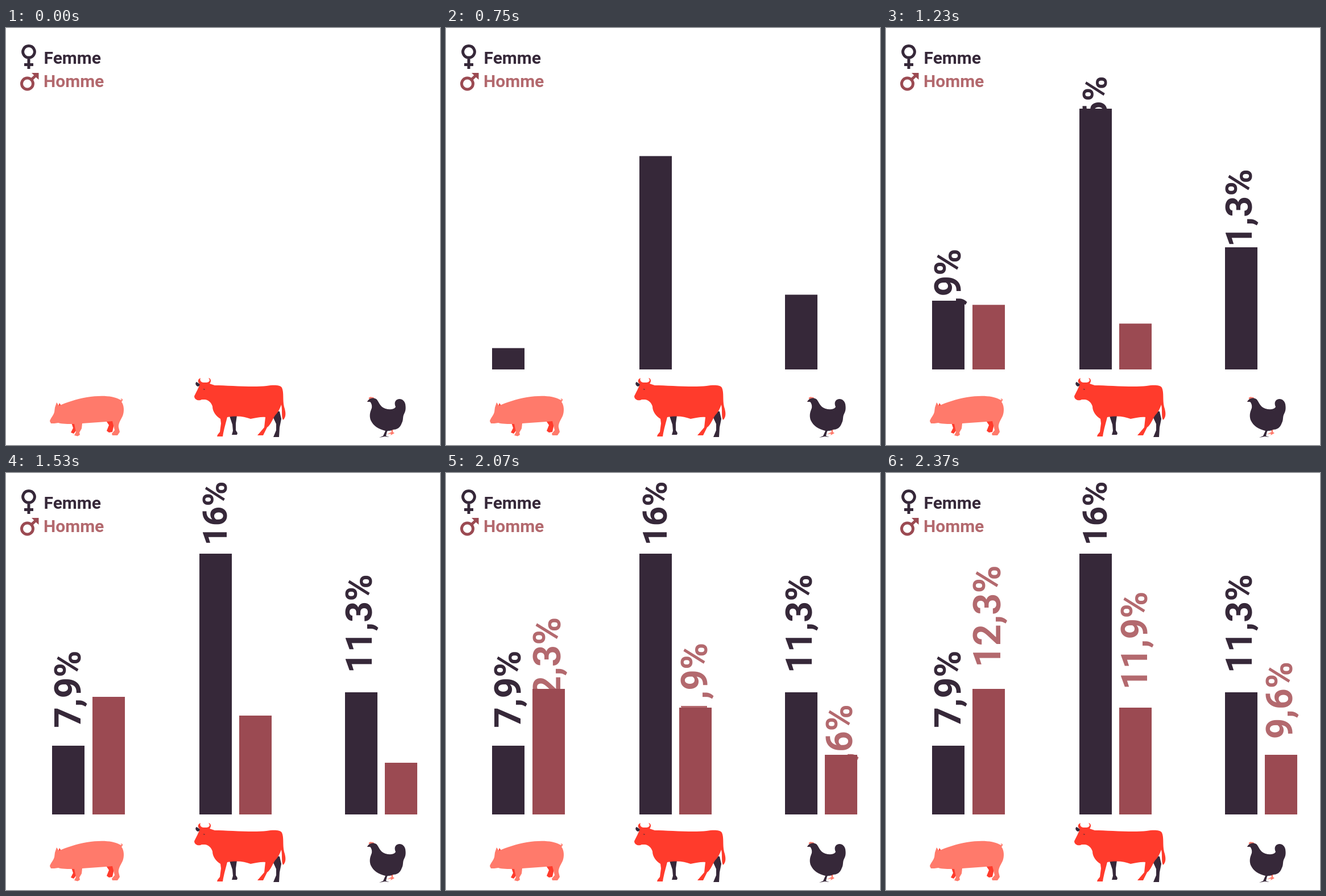
An HTML page for the animation above (3.6 s loop, 763 by 734 pixels).

```html
<!DOCTYPE html>
<html lang="fr">
<head>
<meta charset="utf-8">
<style>
html, body { margin: 0; width: 100%; height: 100%; overflow: hidden; background: #fff; }
svg { display: block; width: 763px; height: 734px; }
text { font-family: Roboto, Arial, sans-serif; font-weight: 700; }
.dark { fill: #362839; }
.wine { fill: #9b4a52; }
.rose { fill: #b3696e; }
.red { fill: #ff3b2c; }
.pink { fill: #ff7a6b; }
.line { fill: none; stroke-width: 5; }
</style>
</head>
<body>
<svg viewBox="0 0 763 734">
  <clipPath id="floor"><rect width="763" height="601"/></clipPath>

  <g id="legend" font-size="30">
    <path class="line" stroke="#362839" d="M40 31.5a10.3 10.3 0 1 0 .01 0M40 52V72M32 64.500H48"/>
    <text class="dark" x="66.5" y="63">Femme</text>
    <circle class="line" stroke="#9b4a52" cx="37.5" cy="98" r="10"/>
    <path class="line" stroke="#9b4a52" d="M44 91.5 53 83"/>
    <path class="wine" d="M45 79H57.5V91L53 87 49 83Z"/>
    <text class="rose" x="66" y="104">Homme</text>
  </g>

  <g id="chart" clip-path="url(#floor)"></g>

  <g id="pig">
    <path class="red" d="M115 695 118 704 114 712 119 714 123 709 126 697ZM175 690 181 699 177 709 181 712 187 711 189 702 190 690ZM92 666 94 660 97 665Z"/>
    <path class="pink" d="M77 692C78 687 83 683 85 676L86 668 89 659 93 665C106 659 124 653 142 650C166 646 188 647 200 654C204 656 205 654 201 653C206 651 206 656 203 658C208 664 208 676 205 683C201 691 197 697 198 703L200 711 196 717H187L186 714 191 708 187 692C174 693 151 695 134 696L133 705 129 712 130 716 126 718.5 120 717 123 711 120 697C109 697 98 697 92 695L85 696 79 696Z"/>
  </g>

  <g id="cow">
    <path class="dark" d="M341 627 335 623C332 625 333 629 337 631L341 630ZM393 683 398 698 399 709 397 716H406L407 713 404 708 404 696 406 682ZM476 674 470 686 475 697 475 708 470 720H480L481 703 484 688 481 675Z"/>
    <path class="red" d="M331 648C335 640 338 634 341 627C336 623 337 618 342 616C340 620 343 624 347 624L353 624C359 623 359 619 356 616C361 617 361 623 358 626L367 629C391 629 434 633 458 630C470 628 482 628 485 633C489 642 486 654 489 667C492 676 493 685 487 690C484 684 486 673 484 663C481 671 478 677 473 682C468 689 466 698 459 703L452 717H442L454 703 456 685C449 684 441 686 430 688C419 684 407 682 389 685L384 704 382 713 381 719H371L372 716 376 711 378 696 377 688C369 683 363 675 363 666C361 660 357 655 350 654L344 654C340 657 331 655 331 648Z"/>
    <path class="dark" d="M347 635 350 636 348 637Z"/>
  </g>

  <g id="hen">
    <path class="pink" d="M676 705 678 711 670 715 677 714 676 717 683 713 680 711 681 704ZM638 653C637 649 640 651 641 649C643 651 646 648 648 653Z"/>
    <path class="red" d="M635 658 638 654 640 658Z"/>
    <path class="dark" d="M635 658C638 651 646 650 651 653C656 658 657 667 667 670C674 672 682 672 685 667C681 658 686 653 692 653C697 653 701 657 702 662C703 668 703 674 700 679C697 684 699 690 696 695C693 704 687 707 680 707C675 710 672 708 670 710L668 718 674 720 666 719 656 721 663 718 667 709C655 706 646 701 641 690C638 681 641 674 643 669C644 664 642 660 640 658Z"/>
  </g>
</svg>

<script>
const LOOP = 3600, STEP = 30, BASE = 601;
const chart = document.getElementById('chart');

// x, bar top, label, baseline x, label top, font size, label travel
const women = [
  [81, 480, '7,9%', 130.5, 315, 64, 76],
  [340, 142, '16%', 388, 17, 60, 70],
  [596, 386, '11,3%', 643, 180.5, 64.5, 70],
];
const men = [
  [152, 380, '12,3%', 201, 165, 66.5, 211],
  [410, 413, '11,9%', 458.5, 211, 64, 209],
  [666, 496, '9,6%', 713.5, 334.500, 64, 174],
];

function add(tag, attrs) {
  const el = document.createElementNS('http://www.w3.org/2000/svg', tag);
  for (const k in attrs) el.setAttribute(k, attrs[k]);
  return chart.appendChild(el);
}

function build(barClass, textClass) {
  return ([x, top, label, bx, by, size, travel]) => {
    const text = add('text', { class: textClass, 'font-size': size, 'text-anchor': 'end' });
    text.textContent = label;
    const bar = add('rect', { class: barClass, x, width: 57 });
    return { top, bx, by, travel, text, bar };
  };
}
const groups = [
  { items: women.map(build('dark', 'dark')), end: 910, speed: 0.5215, from: 900, rest: womenRest },
  { items: men.map(build('wine', 'rose')), end: 1575, speed: 0.311, from: 1710, rest: menRest },
];

// Share of the label's travel still to go
function womenRest(t) {
  const keys = [[895, 3], [990, 2.11], [1110, 1.43], [1230, 1], [1500, 0]];
  for (let i = 1; i < keys.length; i++) {
    const [a, p] = keys[i - 1], [b, q] = keys[i];
    if (t < b) return p + (q - p) * (t - a) / (b - a);
  }
  return 0;
}
function menRest(t) {
  if (t >= 2370) return 0;
  return (1 + Math.cos(Math.PI * (t - 1695) / 690)) / 2;
}

function draw(t) {
  for (const { items, end, speed, from, rest } of groups) {
    for (const { top, bx, by, travel, text, bar } of items) {
      const y = Math.min(BASE, top + Math.max(0, end - t) * speed);
      bar.setAttribute('y', y);
      bar.setAttribute('height', BASE - y);
      text.setAttribute('visibility', t < from ? 'hidden' : 'visible');
      text.setAttribute('transform', `translate(${bx} ${by - 2.5 + travel * rest(t)}) rotate(-90)`);
    }
  }
}

const start = performance.now();
function tick() {
  const t = (performance.now() - start) % LOOP;
  draw(Math.floor(t / STEP) * STEP);
  requestAnimationFrame(tick);
}
tick();
</script>
</body>
</html>
```
